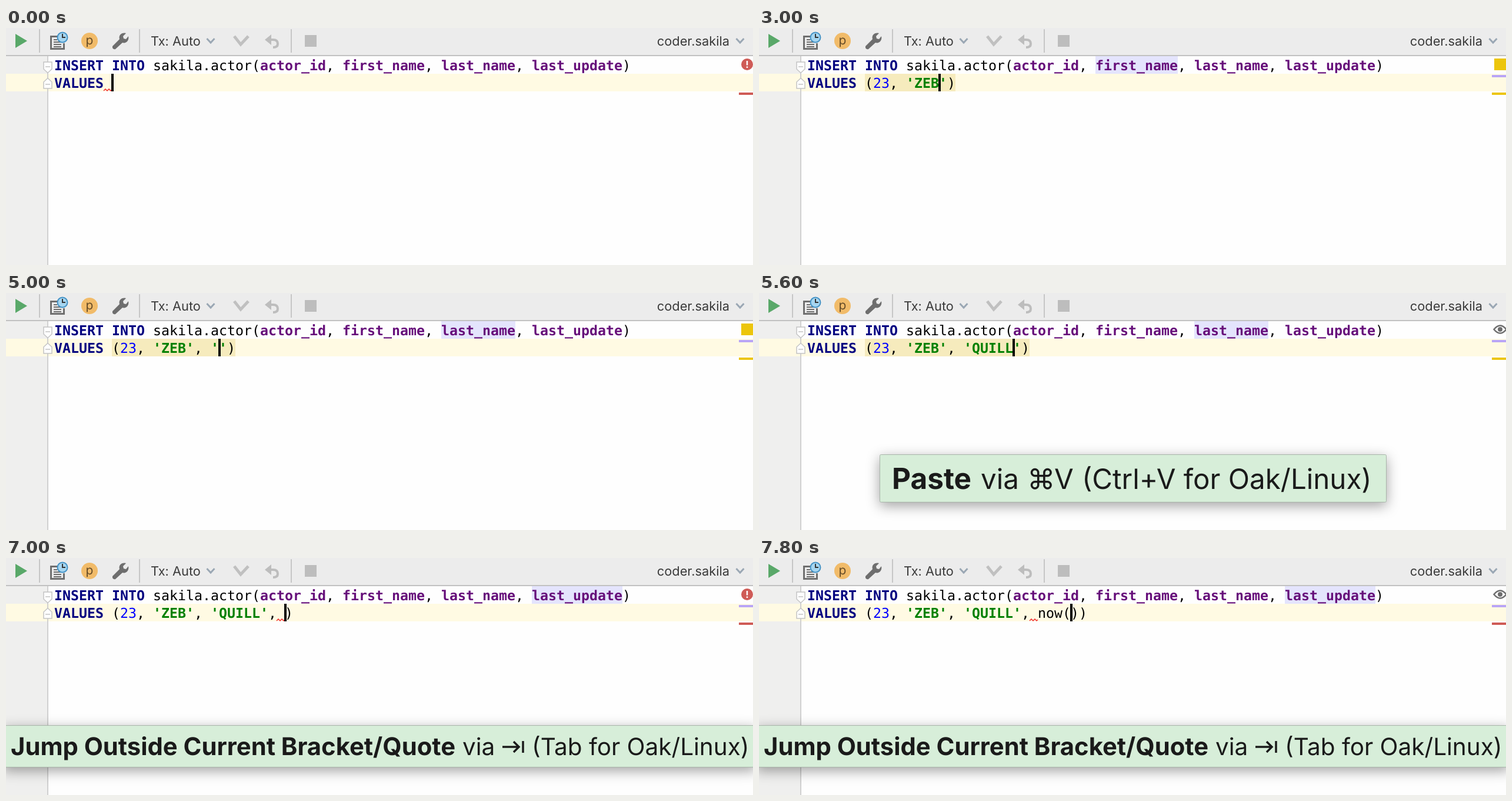
An HTML page for the animation above (8 s loop, 1270 px wide and 404 px high).

```html
<!DOCTYPE html>
<html lang="en">
<head>
<meta charset="utf-8">
<title>SQL editor</title>
<style>
html, body { margin: 0; width: 100%; height: 100%; overflow: hidden; background: #fefefe; }
svg { display: block; width: 100%; height: 100%; }
text { white-space: pre; text-rendering: geometricPrecision; font-family: Inter, Roboto, sans-serif; }
.code { font: 23.254px "DejaVu Sans Mono", monospace; }
.code tspan { font-weight: bold; }
.code .num { fill: #0000ff; font-weight: normal; }
.key { fill: #000080; }
.col { fill: #660e7a; }
.str { fill: #008000; }
.ui { font-size: 21.8px; fill: #3a3a3a; }
.banner { filter: drop-shadow(0 6px 11px rgba(0, 0, 0, .36)); }
.banner rect { fill: #d7eed9; stroke: #a9b5aa; }
.banner text { fill: #1a1a1a; }
.bold { font-weight: 700; }
.line { fill: none; }
</style>
</head>
<body>
<svg viewBox="0 0 1270 404">
  <rect width="1270" height="404" fill="#fefefe"/>
  <rect y="48" width="71" height="356" fill="#efefee"/>
  <rect y="78" width="1270" height="30" fill="#fffae3"/>
  <rect x="70" y="48" width="2" height="356" fill="#d0d0d0"/>

  <!-- toolbar -->
  <rect width="1270" height="46" fill="#ececec"/>
  <rect y="46" width="1270" height="2" fill="#c1c1c1"/>
  <path d="M57 2V42M227 2V42M485 2V42" stroke="#c6c6c6" stroke-width="2"/>
  <path d="M16 10L36 22L16 34Z" fill="#59a869"/>
  <path class="line" d="M88 14.500H76.500V35.500H98.500V26" stroke="#6e6e6e" stroke-width="3"/>
  <path d="M81 20H87M81 24H94M81 28H94M81 32H94" stroke="#6e6e6e" stroke-width="2"/>
  <circle cx="96" cy="16" r="8.500" fill="#a5d5f0" stroke="#4593c6" stroke-width="2"/>
  <path class="line" d="M96 10V16H101" stroke="#333" stroke-width="2"/>
  <circle cx="142" cy="22" r="14" fill="#f1bb69"/>
  <text x="142" y="28" font-size="21" text-anchor="middle" fill="#664c28">p</text>
  <path d="M181 31L193 19C191 12 197 7 204 9L199 14L200 18L204 19L208 14C210 21 204 27 198 25L186 36Q183 37 181 34Z" fill="#6e6e6e"/>
  <text class="ui" x="246" y="30">Tx: Auto</text>
  <path class="line" d="M341.500 18L348 25L354.500 18M1241.500 18L1248 25L1254.500 18" stroke="#9aa7b4" stroke-width="3"/>
  <path class="line" d="M388 14L399 28L412 14" stroke="#c0c0c0" stroke-width="5"/>
  <path d="M440 20L451 11V29Z" fill="#bdbdbd"/>
  <path class="line" d="M449 20H454Q462 20 462 27Q462 33 454 33" stroke="#bdbdbd" stroke-width="4"/>
  <rect x="508" y="12" width="20" height="20" fill="#bdbdbd"/>
  <text class="ui" x="1230" y="30" text-anchor="end">coder.sakila</text>

  <!-- fold marks -->
  <g fill="#fefefe" stroke="#c4c4c4" stroke-width="1.500">
    <path d="M64 58H78V70L71 76.500L64 70Z"/>
    <path d="M64 103H78V92L71 85.500L64 92Z"/>
    <path d="M67 66H75M67 96H75"/>
  </g>

  <!-- code -->
  <rect id="mark" y="48" height="30" fill="#e4e4fd"/>
  <rect id="weak" x="180" y="78" height="30" fill="#f6ebbd"/>
  <text class="code" id="head" x="82" y="72"></text>
  <text class="code" id="body" x="82" y="102"></text>
  <path class="line" id="wave" d="M0 107L3 104L6 107L9 104L12 107L14 105" stroke="#f03030" stroke-width="1.500"/>
  <rect id="caret" y="78" width="4" height="30"/>

  <!-- inspection column -->
  <g id="err">
    <circle cx="1260" cy="62" r="10" fill="#cf5b56"/>
    <path d="M1260 56V63.500M1260 65.500V68" stroke="#fff" stroke-width="2.500"/>
  </g>
  <g id="eye">
    <path class="line" d="M1249.500 62Q1260 49 1270.500 62Q1260 75 1249.500 62Z" stroke="#6e6e6e" stroke-width="2.500"/>
    <circle cx="1260" cy="62" r="4" fill="#6e6e6e"/>
  </g>
  <rect id="warn" x="1250" y="52" width="20" height="20" fill="#ecc50b"/>
  <rect id="usage" x="1246" y="80" width="24" height="4" fill="#b9a5f6"/>
  <rect id="stripe" x="1246" y="110" width="24" height="4"/>

  <g id="jump" class="banner">
    <rect x="-5" y="285.500" width="1280" height="71"/>
    <text class="bold" x="8" y="336" font-size="41.750">Jump Outside Current Bracket/Quote</text>
    <g font-size="40.500">
      <text x="776" y="336">via</text>
      <text x="894" y="336">(Tab for Oak/Linux)</text>
    </g>
    <path class="line" d="M844 322H871M863 313L872 322L863 331M879 312V332" stroke="#1a1a1a" stroke-width="3.500"/>
  </g>
  <g id="paste" class="banner">
    <rect x="205.500" y="275.500" width="861" height="81" rx="2"/>
    <text class="bold" x="226" y="334" font-size="49.500">Paste</text>
    <g font-size="47.500">
      <text x="377" y="334">via</text>
      <text x="456" y="334">⌘</text>
      <text x="502" y="334">V</text>
      <text x="549" y="334">(Ctrl+V for Oak/Linux)</text>
    </g>
  </g>
</svg>
<script>
const LEFT = 82, CELL = 14, LOOP = 8000;
const header = 'INSERT INTO sakila.actor(actor_id, first_name, last_name, last_update)';
const $ = id => document.getElementById(id);
const show = (id, on) => $(id).style.display = on ? '' : 'none';
const colX = col => LEFT + CELL * col;

function paint(id, code) {
  $(id).innerHTML = code.replace(/([A-Z]{4,}(?= |$))|('[^']*')|(\d+)|(\w+_\w+)/g, (word, key, str, num) =>
    `<tspan class="${key ? 'key' : str ? 'str' : num ? 'num' : 'col'}">${word}</tspan>`);
}

const first = "(23, 'ZEB", last = first + "', 'QUILL";
// start, typed text with | as caret, status icon, used column, wave position, weak warning, banner
const steps = [
  [0, '|', 'err', '', 6],
  [400, '', 'err', '', 6],
  [800, '|', 'err', '', 6],
  [1200, '(|)', 'err', '', 6],
  [1400, '(|)', 'eye', '', 6],
  [1800, '(2|)', 'eye', '', 6],
  [2000, '(23|)', 'warn', 'actor_id', 0, 1],
  [2200, '(23, |)', 'err', 'first_name', 11],
  [2400, "(23, '|')", 'warn', 'first_name', 0, 1],
  [2800, "(23, 'ZE|')", 'eye', 'first_name', 0, 1],
  [3000, first + "|')", 'warn', 'first_name', 0, 1],
  [3800, first + "'|)", 'warn', 'first_name', 0, 1, 'jump'],
  [4000, first + "',|)", 'err', 'last_name', 18, 0, 'jump'],
  [4200, first + "', |)", 'err', 'last_name', 18, 0, 'jump'],
  [4400, first + "', '|')", 'eye', 'last_name', 18, 0, 'jump'],
  [4600, first + "', '|')", 'eye', 'last_name', 0, 0, 'jump'],
  [4800, first + "', '|')", 'eye', 'last_name'],
  [5000, first + "', '|')", 'warn', 'last_name', 0, 1],
  [5600, last + "|')", 'eye', 'last_name', 0, 1, 'paste'],
  [6000, last + "|')", 'warn', 'last_name', 0, 1, 'paste'],
  [6400, last + "|')", 'warn', 'last_name', 0, 1],
  [6600, last + "'|)", 'warn', 'last_name', 0, 1, 'jump'],
  [6800, last + "',|)", 'err', 'last_update', 27, 0, 'jump'],
  [7000, last + "', |)", 'err', 'last_update', 27, 0, 'jump'],
  [7200, last + "', n|)", 'eye', 'last_update', 27, 0, 'jump'],
  [7400, last + "', now|)", 'err', 'last_update', 27, 0, 'jump'],
  [7800, last + "', now(|))", 'eye', 'last_update', 27, 0, 'jump']
];

function render([, typed, icon, used, wave, weak, banner]) {
  const line = 'VALUES ' + typed, code = line.replace('|', ''), caret = line.indexOf('|');
  paint('body', code);
  show('caret', caret >= 0);
  $('caret').setAttribute('x', colX(caret) - 1);
  show('wave', wave);
  $('wave').setAttribute('transform', `translate(${colX(wave || 0)})`);
  show('weak', weak);
  $('weak').setAttribute('width', CELL * (code.length - 7));
  show('mark', used);
  show('usage', used);
  $('mark').setAttribute('x', colX(header.indexOf(used)));
  $('mark').setAttribute('width', CELL * used.length);
  $('stripe').setAttribute('fill', weak ? '#ecc50b' : '#cf5b56');
  for (const id of ['err', 'eye', 'warn']) show(id, id === icon);
  for (const id of ['jump', 'paste']) show(id, id === banner);
}

let current;
function tick() {
  const time = performance.now() % LOOP;
  const step = steps.findLast(s => s[0] <= time);
  if (step !== current) render(current = step);
  requestAnimationFrame(tick);
}
paint('head', header);
tick();
</script>
</body>
</html>
```
